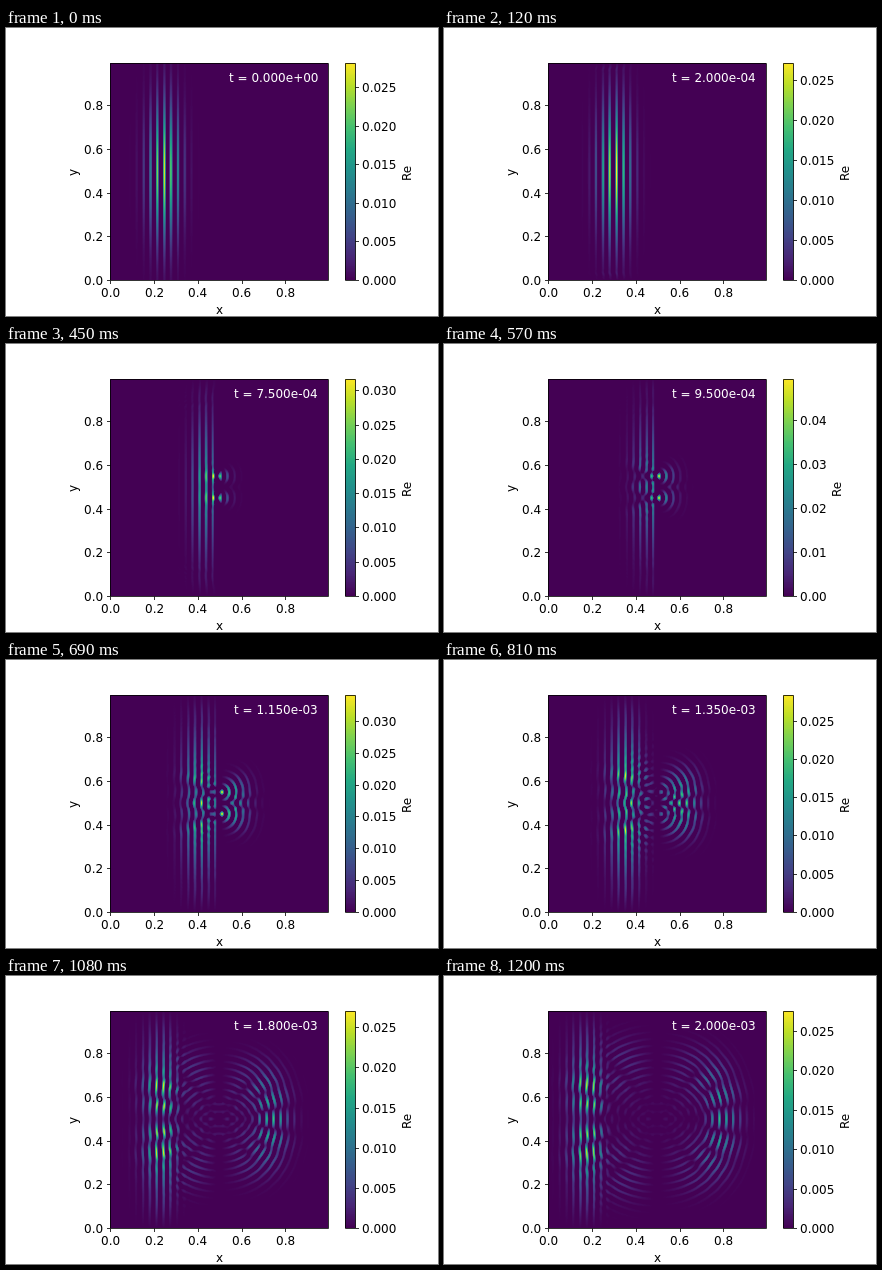
Animation, 432 px wide and 288 px high, one loop 1.23 s. Source, as an HTML page with a canvas:

```html
<!DOCTYPE html>
<html>
<head>
<meta charset="utf-8">
<style>
html, body { margin: 0; width: 100%; height: 100%; overflow: hidden; background: #fff; }
canvas, svg { position: absolute; left: 0; top: 0; width: 432px; height: 288px; }
svg { font: 12px "DejaVu Sans", sans-serif; }
path { stroke: #000; stroke-width: .8; fill: none; }
</style>
</head>
<body>
<canvas width="432" height="288"></canvas>
<svg viewBox="0 0 432 288"><g id="axes"></g><g id="live"></g></svg>
<script>
// Double-slit wave packet: 2D Schrödinger equation, Crank-Nicolson steps.
const N = 199, H = 0.005, FRAMES = 41, FRAME_MS = 30, FRAME_T = 5e-5;
const W = N + 2, MID = 100;            // padded row length, symmetry row
const SWEEPS = 30;

function isWall(x, y) {
  const d = Math.abs(y - 0.5), slit = d > 0.0275 && d < 0.0725;
  return Math.abs(x - 0.5) < 0.0125 && !slit;
}

// Only the lower half is solved; row MID + 1 mirrors row MID - 1.
function simulate() {
  const size = W * (MID + 2);
  const [re, im, bRe, bIm] = Array.from({ length: 4 }, () => new Float64Array(size));
  const open = [];
  const amp = H / Math.sqrt(Math.PI * 0.05 * 0.2);
  for (let j = 1; j <= MID; j++) {
    for (let i = 1; i <= N; i++) {
      const x = i * H, y = j * H, k = j * W + i;
      if (isWall(x, y)) continue;
      open.push(k);
      const dx = x - 0.25, dy = y - 0.5;
      const env = amp * Math.exp(-dx * dx / 0.005 - dy * dy / 0.08);
      re[k] = env * Math.cos(200 * dx);
      im[k] = env * Math.sin(200 * dx);
    }
  }
  const cells = Int32Array.from(open);
  const mirror = () => {
    for (const a of [re, im]) a.copyWithin((MID + 1) * W, (MID - 1) * W, MID * W);
  };
  const around = (a, k) => 0.5 * (a[k - 1] + a[k + 1] + a[k - W] + a[k + W]);

  function step() {
    mirror();
    for (const k of cells) {
      bRe[k] = re[k] + 2 * im[k] - around(im, k);
      bIm[k] = im[k] - 2 * re[k] + around(re, k);
    }
    for (let s = 0; s < SWEEPS; s++) {
      mirror();
      for (let n = 0; n < cells.length; n++) {
        const k = cells[n];
        const cRe = bRe[k] - around(im, k), cIm = bIm[k] + around(re, k);
        re[k] = (cRe + 2 * cIm) / 5;
        im[k] = (cIm - 2 * cRe) / 5;
      }
    }
  }

  const states = [];
  for (let f = 0; f < FRAMES; f++) {
    if (f) { step(); step(); }
    states.push({ field: Float32Array.from(re), max: re.reduce((a, b) => Math.max(a, b)) });
  }
  return states;
}

const STOPS = [0x440154, 0x482576, 0x414487, 0x35608d, 0x2a788e, 0x21908c,
  0x22a884, 0x43bf71, 0x7ad151, 0xbbdf27, 0xfde725];
function viridis(v) {
  const p = Math.min(Math.max(v, 0), 1) * 10, n = Math.min(Math.floor(p), 9);
  return [16, 8, 0].map(s => {
    const a = STOPS[n] >> s & 255, b = STOPS[n + 1] >> s & 255;
    return Math.round(a + (b - a) * (p - n));
  });
}
const palette = Array.from({ length: 256 }, (_, i) => viridis(i / 255));
const colour = v => palette[Math.max(0, Math.min(255, Math.floor(v * 256)))];

const SIZE = 218, LEFT = 104.4, BOTTOM = 252, SPAN = 217.44, UNIT = SPAN / 0.995;
const BAR_LABEL = 356.45;
const ctx = document.querySelector("canvas").getContext("2d");
ctx.font = '12px "DejaVu Sans", sans-serif';
const image = ctx.createImageData(SIZE, SIZE);

// Hann-weighted neighbours for each screen pixel along one axis.
const taps = Array.from({ length: SIZE }, (_, p) => {
  const s = (p + 0.5) * N / SIZE - 0.5, lo = Math.floor(s);
  const clamp = i => Math.min(Math.max(i, 0), N - 1) + 1;
  return { a: clamp(lo), b: clamp(lo + 1), w: 0.5 - 0.5 * Math.cos(Math.PI * (s - lo)) };
});
const rowStart = j => (j > MID ? 2 * MID - j : j) * W;

function drawField({ field, max }) {
  for (let y = 0, o = 0; y < SIZE; y++) {
    const v = taps[y], r0 = rowStart(v.a), r1 = rowStart(v.b);
    for (let x = 0; x < SIZE; x++, o += 4) {
      const { a, b, w } = taps[x];
      const p = field[r0 + a] * (1 - w) + field[r0 + b] * w;
      const q = field[r1 + a] * (1 - w) + field[r1 + b] * w;
      const c = colour((p + (q - p) * v.w) / max);
      image.data[o] = c[0];
      image.data[o + 1] = c[1];
      image.data[o + 2] = c[2];
      image.data[o + 3] = 255;
    }
  }
  ctx.putImageData(image, 104, BOTTOM - SIZE, 0, 1, SIZE, SIZE - 1);
}

const line = d => `<path d="${d}"/>`;
const snap = v => Math.round(v) + 0.5;
const widthOf = s => ctx.measureText(s).width;
// align: 0 = left, 0.5 = centre, 1 = right; the start lands on a whole pixel.
const text = (x, y, s, align = 0, extra = "") =>
  `<text x="${Math.round(x - align * widthOf(s))}" y="${Math.round(y)}" ${extra}>${s}</text>`;
const upright = (x, y, s) =>
  `<text transform="translate(${Math.round(x)} ${y}) rotate(-90)">${s}</text>`;

function drawAxes() {
  for (let y = 35; y < BOTTOM; y++) {
    ctx.fillStyle = `rgb(${colour((BOTTOM - y - 0.5) / SPAN)})`;
    ctx.fillRect(339, y, 10.5, 1);
  }
  let out = line("M104.5 35.5H322.5V252.5H104.5Z") + line("M339.5 35.5H349.5V252.5H339.5Z");
  for (let n = 0; n < 5; n++) {
    const d = n * 0.2 * UNIT, x = LEFT + d, y = BOTTOM - d, label = (n * 0.2).toFixed(1);
    out += line(`M${snap(x)} 252.5v3.5`) + text(x, 269, label, 0.5);
    out += line(`M104.5 ${snap(y)}h-3.5`) + text(LEFT - 7, y + 5, label, 1);
  }
  axes.innerHTML = out + text(213.1, 286, "x", 0.5) + upright(71, 148, "y");
}

function drawFrame(f) {
  const state = states[f];
  drawField(state);
  const time = (f * FRAME_T).toExponential(3).replace(/([+-])(\d)$/, (_, s, d) => s + "0" + d);
  let out = text(312, 54, "t = " + time, 1, 'fill="#fff"');
  // At most nine tick intervals fit on the colour bar.
  const [gap, digits] = state.max > 9 * 0.005 ? [0.01, 2] : [0.005, 3];
  for (let n = 0; n * gap <= state.max; n++) {
    const y = BOTTOM - n * gap / state.max * SPAN;
    out += line(`M349.5 ${snap(y)}h3.5`) + text(BAR_LABEL, y + 5, (n * gap).toFixed(digits));
  }
  live.innerHTML = out + upright(BAR_LABEL + widthOf((0).toFixed(digits)) + 14.2, 153, "Re");
}

const axes = document.getElementById("axes"), live = document.getElementById("live");
const states = simulate();
drawAxes();
drawFrame(0);
let shown = 0;
const start = performance.now();
function tick() {
  const f = Math.floor((performance.now() - start) / FRAME_MS + 1e-6) % FRAMES;
  if (f !== shown) drawFrame(shown = f);
  requestAnimationFrame(tick);
}
requestAnimationFrame(tick);
</script>
</body>
</html>
```
